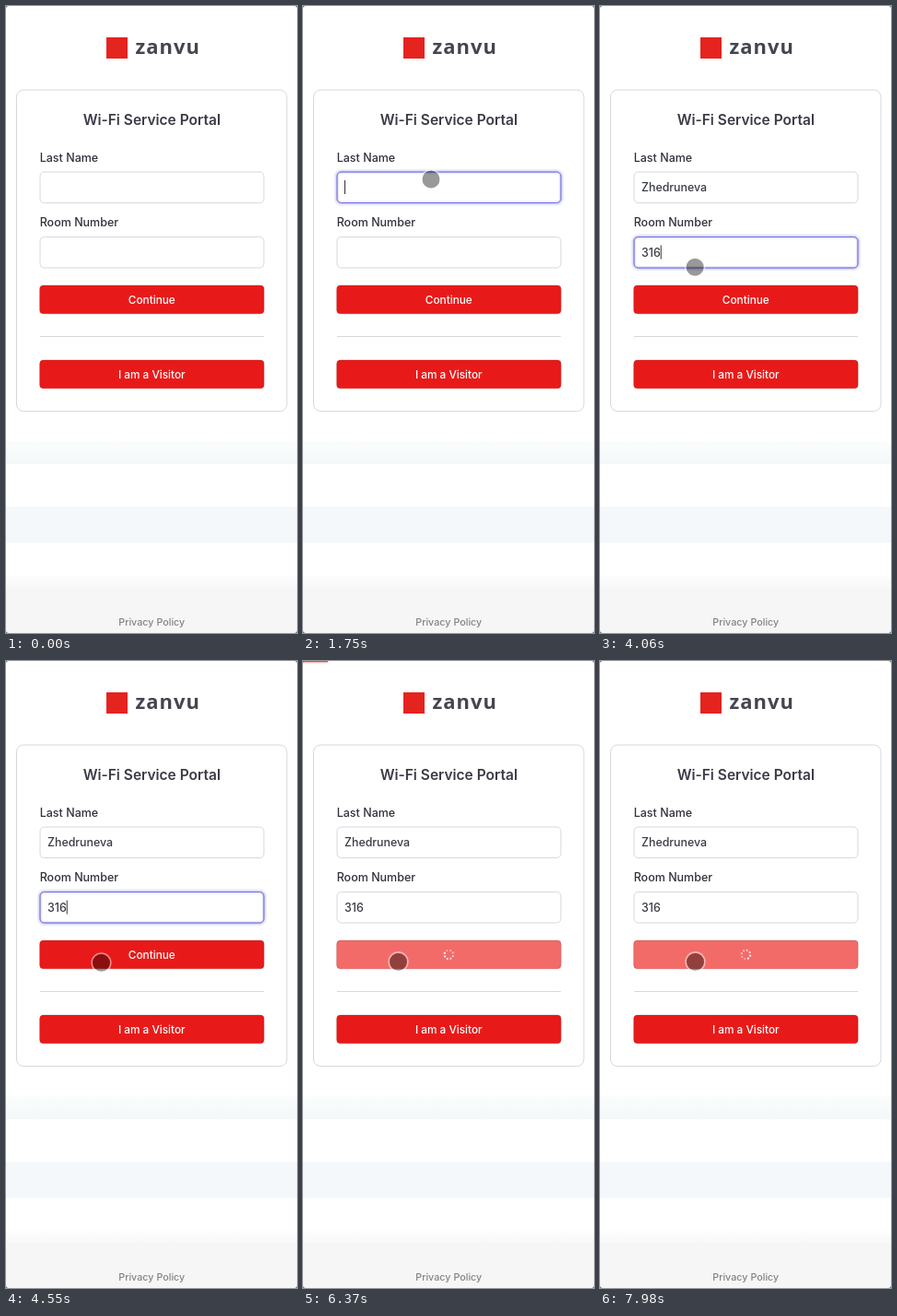
Recreate the animation shown at these times as an HTML page. Size 316 by 680 pixels, loop 8000 ms.

```html
<!DOCTYPE html>
<html lang="en">
<head>
<meta charset="utf-8">
<title>Wi-Fi Service Portal</title>
<style>
  html, body { margin: 0; width: 100%; height: 100%; overflow: hidden; background: #fff; }
  svg { display: block; width: 100vw; height: 100vh; }
  text { font-family: Inter, "Liberation Sans", sans-serif; fill: #30323c; }
  .brand { font: 700 22px "Open Sans", Lato, sans-serif; letter-spacing: 1px; fill: #43464f; }
  .title { font-size: 15.5px; font-weight: 600; fill: #3a3b46; }
  .label { font-size: 12.5px; font-weight: 500; }
  .value { font-size: 12.4px; font-weight: 500; fill: #3a3c45; }
  .action { font-size: 11.8px; font-weight: 500; fill: #fff; }
  .foot { font-size: 10.75px; font-weight: 500; fill: #838386; }
  .mid { text-anchor: middle; }
  .box { fill: #fff; stroke: #d6d8dc; }
  .ring { fill: none; opacity: 0; }
  .btn { fill: #e81a19; stroke: #7a1616; stroke-opacity: .35; stroke-width: .7; }
</style>
</head>
<body>
<svg viewBox="0 0 316 680" preserveAspectRatio="none">
  <defs>
    <linearGradient id="fadeBlue" x2="0" y2="1">
      <stop stop-color="#fbfdfd"/><stop offset="1" stop-color="#f4f8f9"/>
    </linearGradient>
    <linearGradient id="fadeGrey" x2="0" y2="1">
      <stop stop-color="#fdfdfd"/><stop offset="1" stop-color="#f8f8f8"/>
    </linearGradient>
    <filter id="glow" x="-20%" y="-50%" width="140%" height="200%"><feGaussianBlur stdDeviation="1.2"/></filter>
    <g id="ringShape">
      <rect x="36.5" y="0" width="244" height="34.5" rx="5" stroke-width="3" opacity=".35" filter="url(#glow)"/>
      <rect x="37" y=".5" width="243" height="33.5" rx="4.5" stroke-width="1"/>
    </g>
  </defs>

  <rect width="316" height="680" fill="#fff"/>
  <rect y="472" width="316" height="25" fill="url(#fadeBlue)"/>
  <rect y="543" width="316" height="39" fill="#f4f8fa"/>
  <rect y="618" width="316" height="13" fill="url(#fadeGrey)"/>
  <rect y="631" width="316" height="49" fill="#f6f6f6"/>

  <rect x="109" y="34" width="23" height="23" fill="#e5231f"/>
  <text class="brand" x="140.5" y="51.6">zanvu</text>

  <rect x="11.5" y="91" width="293.5" height="348.5" rx="7.5" fill="#fff" stroke="#d6d8dc"/>
  <text class="title mid" x="158.3" y="129.3">Wi-Fi Service Portal</text>

  <text class="label" x="36.7" y="168.8">Last Name</text>
  <rect class="box" x="37" y="180" width="243" height="33.5" rx="4.5"/>
  <g class="ring" id="nameFocus" stroke="#716ee2"><use href="#ringShape" y="179.5"/></g>
  <g class="ring" id="nameError" stroke="#e8332e"><use href="#ringShape" y="179.5"/></g>
  <text class="value" id="name" x="45" y="201.2"></text>
  <line id="spell" x1="45.5" y1="203.3" y2="203.3" stroke="#e5322d" stroke-width="1.2" stroke-dasharray="1.2 1.2"/>

  <text class="label" x="36.7" y="239.3">Room Number</text>
  <rect class="box" x="37" y="250.5" width="243" height="33.5" rx="4.5"/>
  <g class="ring" id="roomFocus" stroke="#716ee2"><use href="#ringShape" y="250"/></g>
  <text class="value" id="room" x="45" y="271.7"></text>
  <rect id="caret" width="1" height="15" fill="#30323c"/>

  <rect class="btn" id="submit" x="36.6" y="303" width="243.6" height="30.8" rx="4"/>
  <text class="action mid" id="submitText" x="158.3" y="322.6">Continue</text>
  <g id="spinner" fill="#fff"></g>

  <path d="M37 358.5H280" stroke="#d6d8dc"/>
  <rect class="btn" x="36.6" y="384" width="243.6" height="30.8" rx="4"/>
  <text class="action mid" x="158.3" y="403.6">I am a Visitor</text>
  <text class="foot mid" x="158.3" y="672">Privacy Policy</text>

  <g id="bar" fill="#ee4641">
    <rect height="2" opacity=".35" filter="url(#glow)"/>
    <rect height="1.2"/>
  </g>

  <g id="cursor">
    <circle r="10.3" fill="none" stroke="#fff" stroke-opacity=".5" stroke-width="1.6"/>
    <circle r="9.5" fill="#000" fill-opacity=".4"/>
  </g>

  <path fill="#6b6b6b" d="M0 0h3Q0 0 0 3zM316 0v3Q316 0 313 0zM0 680v-3Q0 680 3 680zM316 680h-3Q316 680 316 677z"/>
</svg>
<script>
const LOOP = 8000;
const NAME = "Zhedruneva", ROOM = "316";
const el = id => document.getElementById(id);
const [nameText, roomText, spell, caret, submit, submitText, spinner, bar, cursor] =
  ["name", "room", "spell", "caret", "submit", "submitText", "spinner", "bar", "cursor"].map(el);

const clamp = x => Math.min(1, Math.max(0, x));
const smooth = x => x * x * (3 - 2 * x);
const easeOut = x => 1 - (1 - x) ** 3;
const ramp = (t, start, len) => smooth(clamp((t - start) / len));
const pulse = (t, on, off, len = 120) => ramp(t, on, len) - ramp(t, off, len);

// rows of [time, value, ...], eased between neighbours
function track(rows, t, ease) {
  if (t <= rows[0][0]) return rows[0].slice(1);
  for (let i = 1; i < rows.length; i++) {
    const a = rows[i - 1], b = rows[i];
    if (t < b[0]) {
      const k = ease((t - a[0]) / (b[0] - a[0]));
      return a.slice(1).map((v, j) => v + (b[j + 1] - v) * k);
    }
  }
  return rows[rows.length - 1].slice(1);
}

const PATH = [
  [410, 175, 634], [1180, 143, 169], [1230, 143, 169], [1470, 139, 188],
  [2140, 139, 188], [2640, 103, 267],
  [3990, 103, 267], [4715, 103.5, 328], [5200, 103.5, 326.2]
];
const PROGRESS = [
  [4880, 0], [5060, 25.3], [5740, 25.3], [5960, 27], [7600, 27], [7800, 299]
];

for (let i = 0; i < 8; i++) {
  const a = i * Math.PI / 4;
  const dot = document.createElementNS("http://www.w3.org/2000/svg", "circle");
  dot.setAttribute("cx", 4.8 * Math.cos(a));
  dot.setAttribute("cy", 4.8 * Math.sin(a));
  dot.setAttribute("r", 1.1);
  dot.setAttribute("opacity", 0.4 + 0.6 * i / 7);
  spinner.append(dot);
}

function type(node, word, start, step, t) {
  const n = Math.max(0, Math.min(word.length, Math.floor((t - start) / step) + 1));
  const part = word.slice(0, n);
  if (node.textContent !== part) node.textContent = part;
  return part ? node.getComputedTextLength() : 0;
}

function draw(t) {
  const nameWidth = type(nameText, NAME, 2030, 70, t);
  const roomWidth = type(roomText, ROOM, 3220, 210, t);

  el("nameError").style.opacity = pulse(t, 2450, 3010);
  el("nameFocus").style.opacity = pulse(t, 1640, 3010) * (1 - ramp(t, 2450, 120));
  el("roomFocus").style.opacity = pulse(t, 2970, 4660);
  spell.setAttribute("x2", 45 + nameWidth);
  spell.style.opacity = t >= 2450 && t < 3010 ? 1 : 0;

  const inName = t >= 1680 && t < 2590, inRoom = t >= 3010 && t < 4660;
  caret.style.opacity = inName || inRoom ? 1 : 0;
  caret.setAttribute("x", 45 + (inRoom ? roomWidth : nameWidth));
  caret.setAttribute("y", inRoom ? 259.5 : 189);

  const busy = t >= 4690;
  submit.style.fill = `color-mix(in srgb, #f36b68 ${100 * ramp(t, 4660, 130)}%, #e81a19)`;
  submitText.style.opacity = busy ? 0 : 1;
  spinner.style.opacity = busy ? 1 : 0;
  spinner.setAttribute("transform", `translate(158.4 318.4) rotate(${(t - 4690) * 0.36})`);

  const [width] = track(PROGRESS, t, smooth);
  for (const part of bar.children) part.setAttribute("width", width);
  bar.style.opacity = 1 - ramp(t, 7760, 180);

  const [x, y] = track(PATH, t, easeOut);
  cursor.setAttribute("transform", `translate(${x} ${y})`);
  cursor.style.opacity = ramp(t, 360, 80);
}

const begin = performance.now();
function tick(now) {
  draw(Math.max(0, now - begin) % LOOP);
  requestAnimationFrame(tick);
}
draw(0);
requestAnimationFrame(tick);
</script>
</body>
</html>
```
